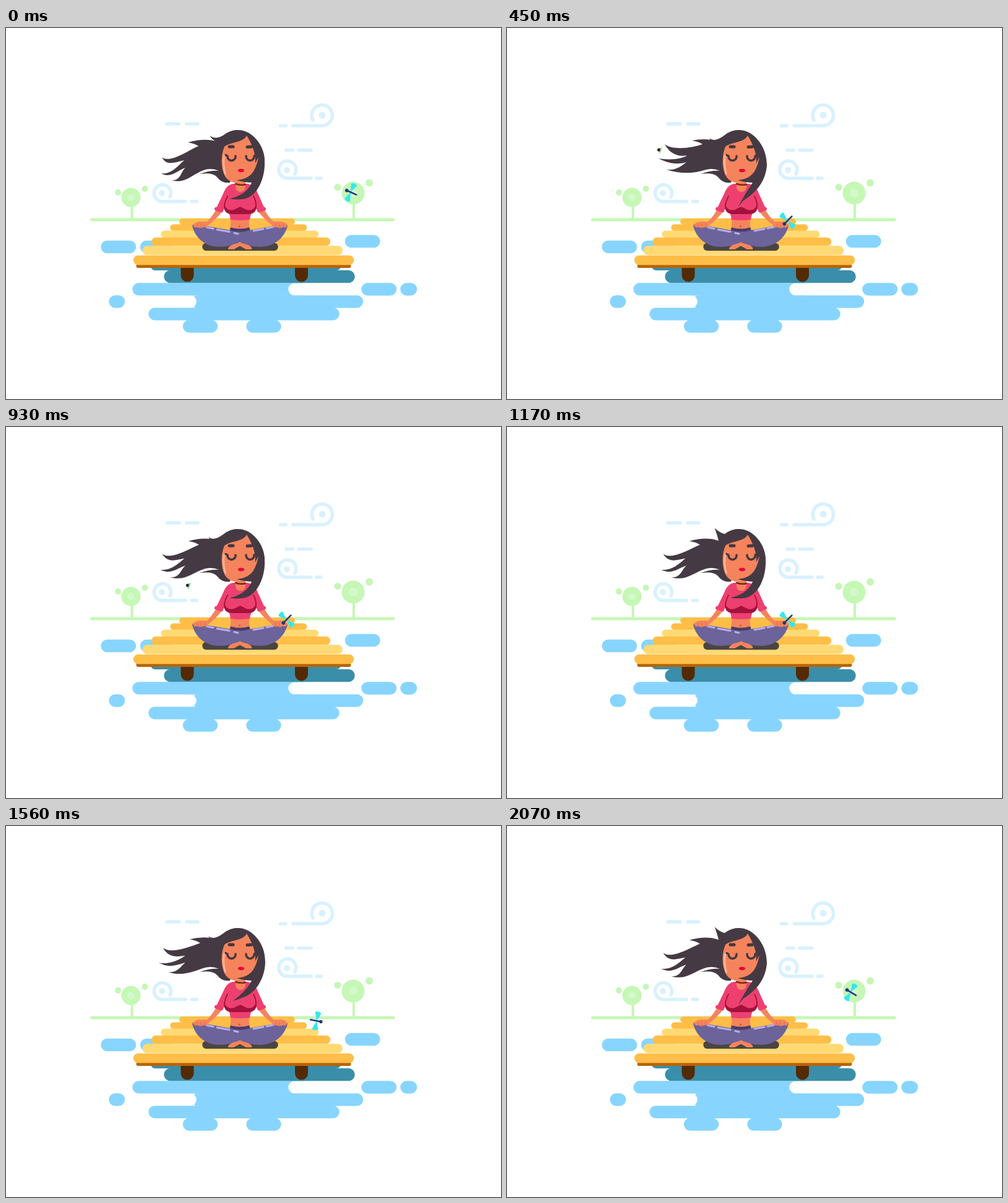
These frames come from a looping animation (800 by 600 pixels, 2.1 s). An HTML page:

```html
<!DOCTYPE html>
<html lang="en">
<head>
<meta charset="utf-8">
<title>Meditation on the pier</title>
<style>
html, body { margin: 0; width: 100%; height: 100%; overflow: hidden; background: #fff; }
svg { display: block; width: 100vw; height: 100vh; }
.line { fill: none; stroke-linecap: round; stroke-linejoin: round; }
</style>
</head>
<body>
<svg viewBox="0 0 800 600">
  <!-- shore and trees -->
  <g fill="#c5f7b5">
    <path class="line" stroke="#c5f7b5" stroke-width="5" d="M138.500 310H626"/>
    <path class="line" stroke="#c5f7b5" stroke-width="4" d="M203.500 285V309M562 282V309"/>
    <circle cx="202" cy="274" r="15.500"/><circle cx="181" cy="266" r="5"/><circle cx="224.500" cy="260" r="5"/>
    <circle cx="561" cy="267" r="18.500"/><circle cx="536" cy="257.500" r="5.500"/><circle cx="587" cy="250.500" r="6"/>
    <g fill="#d3f8ca"><circle cx="202" cy="274" r="6"/><circle cx="561" cy="267" r="7"/></g>
  </g>

  <!-- wind -->
  <g class="line" stroke="#d9f1ff" stroke-width="5.500">
    <path d="M260 155H280M292 155H310M443.500 158H452M453 197.500H463M473 197.500H493M502 243H509M300 280.500H308"/>
    <path d="M496 149A16.700 16.700 0 1 1 511 158H464"/>
    <path d="M467 236A14 14 0 1 0 454 243H493"/>
    <path d="M265 273A13.500 13.500 0 1 0 252 280.500H290"/>
  </g>
  <g fill="#d9f1ff"><circle cx="511" cy="141" r="5.500"/><circle cx="454" cy="230" r="5"/><circle cx="252" cy="267" r="5"/></g>

  <!-- water -->
  <g class="line" stroke="#87d5ff" stroke-width="20.500">
    <path d="M163.500 354H200M227 354H260M558 345H594.500M214.500 422.500H480M584.500 422.500H621M647.500 422.500H654"/>
    <path d="M176.500 442.500H182M310 442.500H567M240.500 462.500H528.500M296 482.500H332M398.500 482.500H434.500"/>
    <path stroke="#fff" stroke-width="19.500" d="M466 422.500H564M202 442.500H298"/>
    <path stroke="#3b8ea9" d="M265.500 402H553.500"/>
    <path stroke="#3b8ea9" stroke-width="14" d="M241 385H534"/>
  </g>

  <!-- pier -->
  <g class="line" stroke="#ffbe48">
    <path stroke="#532a04" stroke-width="21" d="M293 385V400M477.500 385V400"/>
    <path stroke-width="10" d="M285 313H462"/>
    <path stroke-width="10.500" d="M270.500 322.700H481"/>
    <path stroke="#ffda74" stroke-width="11.500" d="M256 333.500H499.500"/>
    <path stroke-width="13.500" d="M242 345.500H517.500"/>
    <path stroke="#ffda74" stroke-width="15" d="M228 359.700H536.500"/>
    <path stroke="#b5650a" stroke-width="6" d="M213.500 385H554.500"/>
    <path stroke-width="15.500" d="M213.500 375.500H554.500"/>
  </g>

  <g id="bee">
    <path class="line" stroke="#6de9e0" stroke-width="2" d="M1 -1L4 -3M0 2L1 5"/>
    <ellipse rx="3.200" ry="2.600" fill="#1d2226"/>
    <path class="line" stroke="#e8dc3c" stroke-width="1.500" d="M2 -1V2"/>
  </g>

  <path id="hair" fill="#453a43"/>

  <!-- legs and cushion -->
  <path class="line" stroke="#4a4540" stroke-width="12.500" d="M323.500 354H433.500"/>
  <path fill="#f5845c" d="M362 307H394Q391 316 395 328H361Q365 316 362 307Z"/>
  <path fill="#4a3c66" d="M363 322.500Q378 327 393 322.500L397 333H360Z"/>
  <path fill="#6c639b" d="M301 320Q302 316 309 317.500L362 327Q378 332 394 327L447 317.500Q455 316 455 320C451 337 435 354 411 354Q392 354 378 346.500Q363 354 345 354C320 354 305 337 301 320Z"/>
  <path fill="#f5845c" d="M378 347L366 350.500Q358 354 359 358H368L378 352.500L388 358H397Q399 354 390 350.500Z"/>
  <path class="line" stroke="#b5aef0" stroke-width="3" d="M325 322.500L335 324.500M341 326L361 329.500M369 331.500L375 333M400 328L416 325M421 324L431 322"/>

  <!-- arms, neck and top -->
  <g fill="#f5845c">
    <path id="arm" d="M340 293L350 296Q340 309 327 319Q326 324 319 322Q314 325 310 322Q304 324 302.500 319Q306 312 315 313L325 313Q334 304 340 293Z"/>
    <use href="#arm" transform="matrix(-1 0 0 1 757 0)"/>
  </g>
  <path class="line" stroke="#d96847" stroke-width="1" d="M309 317V321M315 317V322M321 317V321M436 317V321M442 317V322M448 317V321"/>
  <circle cx="377.500" cy="321" r="1.500" fill="#c4563c"/>
  <path fill="#ee4070" d="M366 252Q356 254 351 268L340 291L350 296L355 290Q362 300 363 310Q378 312 394 310Q395 300 402 290L407 296L418 292L405 263Q400 254 391 252Z"/>
  <path fill="#a3123c" d="M352.500 284Q356 297 368 294L378.500 289L389 294Q401 297 404.500 284Q407 301 391 301H366Q350 301 352.500 284Z"/>
  <path class="line" stroke="#a3123c" stroke-width="1.800" d="M358 272Q354 279 353 287M400 272Q404 279 404 287"/>
  <path class="line" stroke="#ee4070" stroke-width="6" d="M340 292.500L348 295.500M409 295.500L417 292.500"/>
  <path fill="#f5845c" d="M371 240H387V257Q386 265 379 265Q372 265 371 257Z"/>
  <path class="line" stroke="#7d2a20" stroke-width="2.500" d="M371 252Q379 255 387 253"/>

  <!-- head -->
  <path fill="#453a43" d="M348 200C342 176 360 165 375 165C398 165 418 190 418 215L405 230Z"/>
  <path fill="#f5845c" d="M389 174C383 186 362 184 353 192C347 205 347 225 353 238C358 248 368 251 378 251C392 251 409 235 409 212C407 195 396 182 389 174Z"/>
  <path class="line" stroke="#fab79d" stroke-width="2.800" d="M352.500 206Q350 222 354.500 236"/>
  <g class="line" stroke="#463740">
    <path stroke-width="5" d="M361 192H367M390 192.500L396.500 192"/>
    <path stroke-width="3.500" d="M355 205.500L358 207V208A6.500 6.500 0 0 0 371 208V207M388 207V208A6.500 6.500 0 0 0 401 208V207L404 205.500"/>
  </g>
  <ellipse cx="380" cy="230.500" rx="5.200" ry="2.700" fill="#e6003f"/>
  <path id="lock" fill="#453a43"/>

  <g id="dragonfly">
    <path fill="#33e8f0" d="M1 0L6 13Q2 17 -4 14ZM1 0L6 -13Q2 -17 -4 -14Z"/>
    <path class="line" stroke="#26357a" stroke-width="2.600" d="M-9 0H8"/>
    <circle cx="8" r="2.800" fill="#26357a"/>
  </g>
</svg>
<script>
const LOOP = 2100, STEP = 30, HAIR_BEAT = 300, LOCK_BEAT = 270;
const byId = id => document.getElementById(id);

// time, x, y
const beeStops = [
  [0, 325, 205], [450, 246, 197], [660, 286, 170], [930, 294, 256],
  [1380, 425, 257], [1740, 381, 159], [LOOP, 325, 205]
];
// time, x, y, heading
const flyStops = [
  [0, 558, 266, 204], [400, 454, 311, 135], [1230, 454, 311, 135],
  [1380, 464, 325, 90], [1740, 538, 305, -68], [LOOP, 558, 266, -156]
];

function at(stops, t) {
  const i = stops.findIndex(s => s[0] > t);
  const a = stops[i - 1], b = stops[i], f = (t - a[0]) / (b[0] - a[0]);
  return a.slice(1).map((v, n) => v + (b[n + 1] - v) * f);
}

// repeating bump from 0 to 1, highest when turn is whole; more power makes it narrower
const pulse = (turn, power) => ((1 + Math.cos(turn * 2 * Math.PI)) / 2) ** power;

// sag lowers the strands, flick raises the small spike on the crown
function hairPath(sag, flick) {
  const sx = 327 + 10 * flick, sy = 178 - 17 * flick;
  const ax = 299 - 5 * sag, ay = 182 + 3 * sag;
  const bx = 255 - 3 * sag, by = 188 + 21 * sag;
  const cx = 245 + 5 * sag, cy = 211 + 24 * sag;
  const dx = 257 + 10 * sag, dy = 229 + 17 * sag;
  const abx = ax + 17, aby = ay + 6;
  const bcx = 291 - 3 * sag, bcy = 206 + 8 * sag;
  const cdx = 290, cdy = 217 + 9 * sag;
  return `M375 165Q362 165 352 173Q${sx + 8} ${sy + 8} ${sx} ${sy}
    Q${sx + 3} ${sy + 8} 342 184Q322 177 ${ax} ${ay}Q${ax + 12} ${ay + 2} ${abx} ${aby}
    C${abx - 14} ${aby + 5} ${bx + 14} ${by + 11} ${bx} ${by}
    C${bx + 8} ${by + 15} ${bcx - 15} ${bcy + 3} ${bcx} ${bcy}
    C${bcx - 8} ${bcy + 6} ${cx + 18} ${cy + 3} ${cx} ${cy}
    C${cx + 18} ${cy + 9} ${cdx - 14} ${cdy + 4} ${cdx} ${cdy}
    C${cdx - 8} ${cdy + 6} ${dx + 16} ${dy + 2} ${dx} ${dy}
    C${dx + 24} ${dy + 7} 300 236 322 229
    Q334 226 344 231Q330 230 313 236Q334 233 341 241Q349 252 362 250L375 200Z`;
}

// drop: 0 blown to the side, 1 hanging down
function lockPath(drop) {
  return `M389 169C410 180 ${419 + drop} 200 ${418 + 2 * drop} 222
    C${417 + drop} 250 ${402 - 2 * drop} ${277 - 9 * drop} ${380 + 2 * drop} ${277 + 2 * drop}
    Q${370 + 6 * drop} ${278 + 8 * drop} ${361 + 12 * drop} ${276 + 14 * drop}
    Q${389 - 3 * drop} ${270 - 4 * drop} 397 250Q385 250 373 246
    Q395 244 402 228Q406 220 408 209L402.500 219Q405 200 389 174Z`;
}

function draw(now) {
  const t = Math.floor(now % LOOP / STEP) * STEP;
  const beat = t / HAIR_BEAT;
  byId('hair').setAttribute('d', hairPath(pulse(beat, 2), pulse(beat + .15, 6)));
  byId('lock').setAttribute('d', lockPath(pulse(t / LOCK_BEAT + 1 / 3, 6)));
  const [bx, by] = at(beeStops, t);
  byId('bee').setAttribute('transform', `translate(${bx} ${by})`);
  const [x, y, heading] = at(flyStops, t);
  byId('dragonfly').setAttribute('transform', `translate(${x} ${y}) rotate(${heading})`);
}

let start;
function tick(now) {
  start ??= now;
  draw(now - start);
  requestAnimationFrame(tick);
}
draw(0);
requestAnimationFrame(tick);
</script>
</body>
</html>
```
